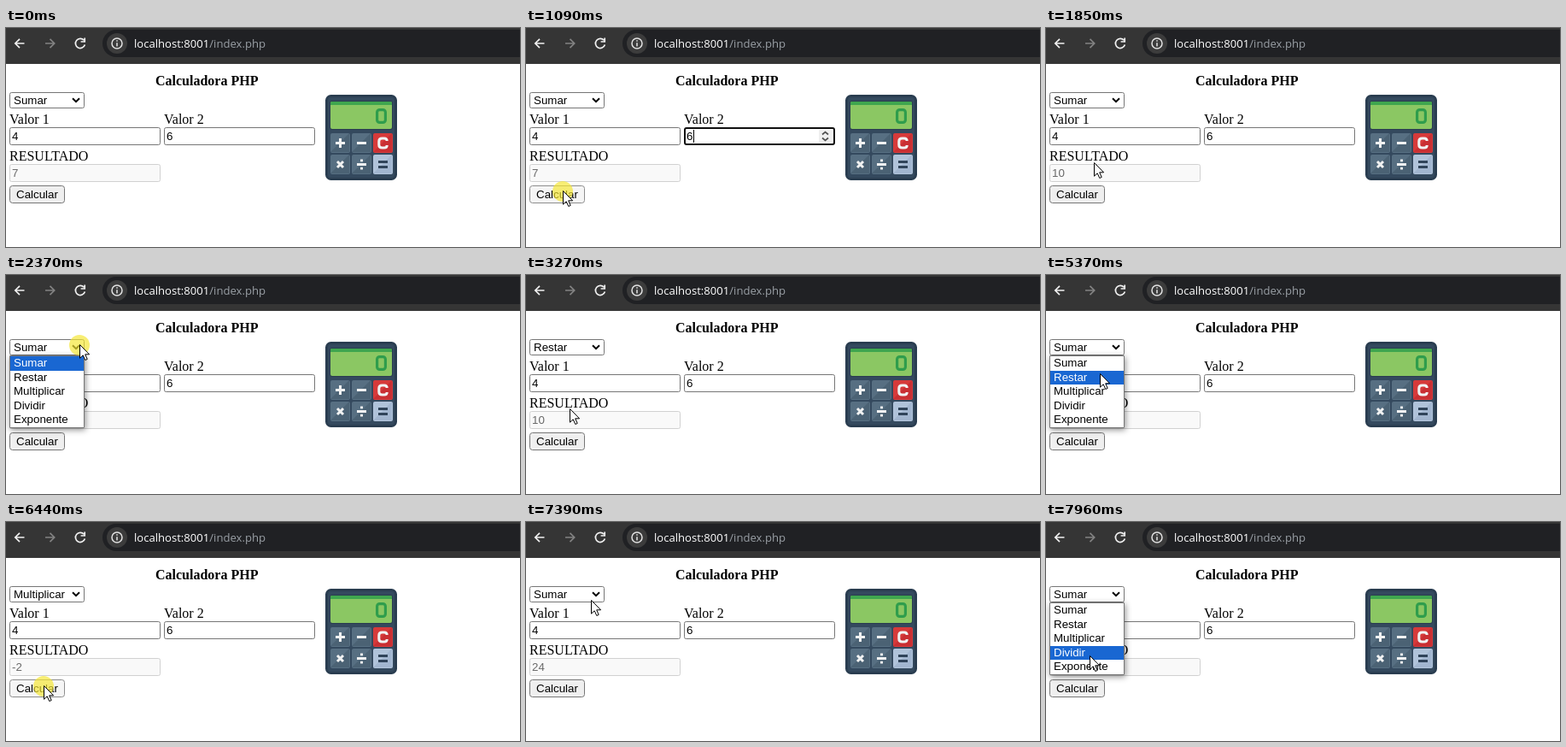
An HTML page with a canvas that plays this animation: 602 px wide and 256 px high, repeating every 8 s.

```html
<!DOCTYPE html>
<html lang="es">
<head>
<meta charset="utf-8">
<title>Calculadora PHP</title>
<style>
html, body { margin: 0; width: 100%; height: 100%; overflow: hidden; background: #fff; }
canvas { display: block; width: 602px; height: 256px; }
</style>
</head>
<body>
<canvas id="stage"></canvas>
<script>
const WIDTH = 602, HEIGHT = 256, LOOP = 8000;
const SANS = '13.333px "Liberation Sans", Arial, sans-serif';
const SERIF = '16px "Liberation Serif", "Times New Roman", serif';
const URL_FONT = '13.1px "Open Sans", "Noto Sans", sans-serif';
const BORDER = '#767676';
const OPTIONS = ['Sumar', 'Restar', 'Multiplicar', 'Dividir', 'Exponente'];
const ITEM_TOP = 95, ITEM_HEIGHT = 16.6;

// Pointer path: time, x, y
const PATH = [
  [200, 464, 226], [390, 103, 138], [600, 103, 138], [680, 105, 126], [820, 105, 126],
  [1050, 43, 190], [1670, 43, 190], [2170, 86, 81], [2450, 86, 81], [2740, 60, 118],
  [3020, 60, 118], [3510, 42, 192], [4520, 42, 192], [5040, 84, 80], [5260, 84, 80],
  [5370, 63, 115], [5580, 62, 131], [5740, 62, 131], [6190, 44, 191], [6810, 44, 191],
  [7500, 78, 84], [7640, 76, 88], [7720, 66, 115], [7860, 53, 162], [7960, 51, 156]
];
const CLICKS = [[1060, 1230], [2340, 2460], [3020, 3070], [4060, 4160], [5000, 5080],
  [5740, 5790], [6440, 6570], [7480, 7570]];
const MENU_OPEN = [[2340, 3030], [5040, 5750], [7540, LOOP]];
const SELECTED = [[0, 'Sumar'], [3030, 'Restar'], [4190, 'Sumar'], [5750, 'Multiplicar'], [6580, 'Sumar']];
const RESULTS = [[0, '7'], [1220, '10'], [4190, '-2'], [6580, '24']];
const FOCUS = [[0, 0], [650, 1], [780, 2], [1220, 0]];
const LOADING = [[4110, 4190]];

const canvas = document.getElementById('stage');
const ctx = canvas.getContext('2d');
const ratio = window.devicePixelRatio || 1;
canvas.width = WIDTH * ratio;
canvas.height = HEIGHT * ratio;
ctx.scale(ratio, ratio);

const within = (spans, t) => spans.some(([from, to]) => t >= from && t < to);
const valueAt = (steps, t) => steps.filter(([from]) => from <= t).pop()[1];
const inBox = (p, x, y, w, h) => p && p.x >= x && p.x < x + w && p.y >= y && p.y < y + h;

function pointerAt(t) {
  if (t < PATH[0][0]) return null;
  const next = PATH.findIndex(([time]) => time > t);
  if (next < 0) {
    const [, x, y] = PATH[PATH.length - 1];
    return { x, y };
  }
  const [t0, x0, y0] = PATH[next - 1], [t1, x1, y1] = PATH[next];
  const u = (t - t0) / (t1 - t0), ease = u * u * (3 - 2 * u);
  return { x: Math.round(x0 + (x1 - x0) * ease), y: Math.round(y0 + (y1 - y0) * ease) };
}

function text(string, x, y, font = SANS, color = '#000') {
  ctx.font = font;
  ctx.fillStyle = color;
  ctx.fillText(string, x, y);
}

function box(x, y, w, h, radius, fill, stroke, line = 1) {
  const inset = stroke ? line / 2 : 0;
  ctx.beginPath();
  ctx.roundRect(x + inset, y + inset, w - 2 * inset, h - 2 * inset, radius);
  if (fill) { ctx.fillStyle = fill; ctx.fill(); }
  if (stroke) { ctx.strokeStyle = stroke; ctx.lineWidth = line; ctx.stroke(); }
}

function stroke(path, color, width) {
  ctx.strokeStyle = color;
  ctx.lineWidth = width;
  ctx.stroke(new Path2D(path));
}

function disc(x, y, r, color) {
  ctx.fillStyle = color;
  ctx.beginPath();
  ctx.arc(x, y, r, 0, Math.PI * 2);
  ctx.fill();
}

function drawToolbar(loading) {
  box(0, 0, WIDTH, 42, 0, '#353535');
  box(113, 2, WIDTH, 32, 16, '#202124');
  stroke('M21.5 18H11M16 12.8L10.8 18L16 23.2', '#f0f0f0', 1.7);
  stroke('M46 18H56.5M51.5 12.8L56.7 18L51.5 23.2', '#828282', 1.7);
  if (loading) {
    stroke('M82 13L92 23M92 13L82 23', '#f0f0f0', 1.7);
  } else {
    stroke('M91.3 14.3A5.6 5.6 0 1 0 92.4 19.5M92.2 11.5V16H87.6', '#f0f0f0', 1.7);
  }
  disc(130, 18, 12, '#3c3c3c');
  stroke('M136 18A6 6 0 1 0 124 18A6 6 0 1 0 136 18M130 17.3V21.5M130 14.2V15.8', '#e3e3e3', 1.5);
  text('localhost:8001', 150, 23, URL_FONT, '#fff');
  const hostWidth = ctx.measureText('localhost:8001').width;
  text('/index.php', 150 + hostWidth, 23, URL_FONT, '#9aa0a6');
}

function drawCalculator() {
  box(374, 78, 84, 100, 5, '#34495e', '#2a3d50', 3);
  box(379, 85, 74, 34, 3, '#2a3d50');
  box(380, 86, 72, 32, 2, '#8bc763');
  box(380, 86, 72, 4, [2, 2, 0, 0], '#3fa64f');
  box(433, 94, 13, 18, 3, null, '#2f9d4c', 3.2);

  const key = (col, row, fill, shade, sign, color = '#f1f2f2') => {
    const x = 380 + col * 25, y = 123 + row * 25;
    box(x, y, 23, 23, 2, fill);
    ctx.fillStyle = shade;
    ctx.fill(new Path2D(`M${x} ${y + 22}L${x + 22} ${y}V${y + 22}Z`));
    ctx.save();
    ctx.translate(x + 11.5, y + 11.5);
    stroke(sign, color, 3);
    ctx.restore();
  };
  key(0, 0, '#576f82', '#4b6274', 'M-5.5 0H5.5M0 -5.5V5.5');
  key(1, 0, '#576f82', '#4b6274', 'M-5.5 0H5.5');
  key(2, 0, '#d63a3a', '#c92f33', 'M4.7 -2.5Q4.7 -5.5 1.5 -5.5H-1Q-4.7 -5.5 -4.7 -2V2Q-4.7 5.5 -1 5.5H1.5Q4.7 5.5 4.7 2.5');
  key(0, 1, '#576f82', '#4b6274', 'M-3.5 -3.5L3.5 3.5M3.5 -3.5L-3.5 3.5');
  key(1, 1, '#576f82', '#4b6274', 'M-5.5 0H5.5M0 -6V-3.2M0 3.2V6');
  key(2, 1, '#b0c3da', '#a2b6d0', 'M-5.5 -3H5.5M-5.5 3H5.5', '#30445a');
}

function drawField(x, value, focused, pointer) {
  box(x, 116, 177, 21, 2, '#fff', focused ? '#101010' : BORDER, focused ? 2 : 1);
  text(value, x + 3, 131);
  if (focused) box(x + 11, 119, 1, 15, 0, '#000');
  if (focused || inBox(pointer, x, 116, 177, 21)) {
    box(x + 158, 119, 15, 15, 1, '#efefef');
    stroke(`M${x + 162} 124.5l3.5 -3l3.5 3M${x + 162} 128.5l3.5 3l3.5 -3`, '#505050', 1.7);
  }
}

function drawMenu(pointer) {
  ctx.save();
  ctx.shadowColor = 'rgba(0,0,0,.45)';
  ctx.shadowBlur = 7 * ratio;
  ctx.shadowOffsetX = ratio;
  ctx.shadowOffsetY = 2 * ratio;
  box(4, 94, 88, 85, 0, '#fff');
  ctx.restore();
  box(4, 94, 88, 85, 0, '#fff', BORDER);
  const itemTop = i => Math.round(ITEM_TOP + i * ITEM_HEIGHT);
  const hovered = Math.max(0, Math.floor((pointer.y - ITEM_TOP) / ITEM_HEIGHT));
  OPTIONS.forEach((option, i) => {
    if (i === hovered) box(5, itemTop(i), 86, itemTop(i + 1) - itemTop(i), 0, '#1967d2');
    text(option, 9, Math.round(107 + i * 16.5), SANS, i === hovered ? '#fff' : '#000');
  });
}

function drawPointer({ x, y }, overText) {
  ctx.save();
  ctx.translate(x, y);
  if (overText) {
    stroke('M-3 -7.5H3M0 -7.5V7.5M-3 7.5H3', '#222', 1);
  } else {
    const arrow = new Path2D('M.5 .5V16.2L4.2 12.8L6.8 18.5L9.2 17.4L6.7 11.8H11.6Z');
    ctx.fillStyle = '#fff';
    ctx.fill(arrow);
    ctx.strokeStyle = '#000';
    ctx.lineWidth = 1;
    ctx.stroke(arrow);
  }
  ctx.restore();
}

function drawButton(hovered, pressed) {
  const fill = pressed ? '#f5f5f5' : hovered ? '#e9e9e9' : '#efefef';
  box(4, 184, 65, 21, 3, fill, pressed ? '#8d8d8d' : BORDER);
  text('Calcular', 12, 199);
}

function draw(t) {
  const pointer = pointerAt(t), focus = valueAt(FOCUS, t);
  const menuOpen = within(MENU_OPEN, t), clicking = within(CLICKS, t);
  const hoverTarget = menuOpen ? null : pointer;
  box(0, 0, WIDTH, HEIGHT, 0, '#fff');
  drawToolbar(within(LOADING, t));

  text('Calculadora PHP', 175, 67, 'bold ' + SERIF);
  text('Valor 1', 4, 112, SERIF);
  text('Valor 2', 185, 112, SERIF);
  text('RESULTADO', 4, 155, SERIF);

  box(4, 75, 88, 19, 2, '#fff', BORDER);
  text(valueAt(SELECTED, t), 9, 89);
  stroke('M78 82.2L82 86.2L86 82.2', '#000', 2);

  drawField(4, '4', focus === 1, hoverTarget);
  drawField(185, '6', focus === 2, hoverTarget);
  box(4, 159, 177, 21, 2, '#f9f9f9', '#d1d1d1');
  text(valueAt(RESULTS, t), 7, 174, SANS, '#6a6a6a');

  const overButton = inBox(hoverTarget, 4, 184, 65, 21);
  drawButton(overButton, overButton && clicking);

  drawCalculator();
  if (menuOpen) drawMenu(pointer);
  if (!pointer) return;
  if (clicking) disc(pointer.x, pointer.y + 1, 12, 'rgba(244,230,50,.68)');
  drawPointer(pointer, inBox(hoverTarget, 4, 116, 177, 21));
}

const start = performance.now();
function tick() {
  draw((performance.now() - start) % LOOP);
  requestAnimationFrame(tick);
}
tick();
</script>
</body>
</html>
```
